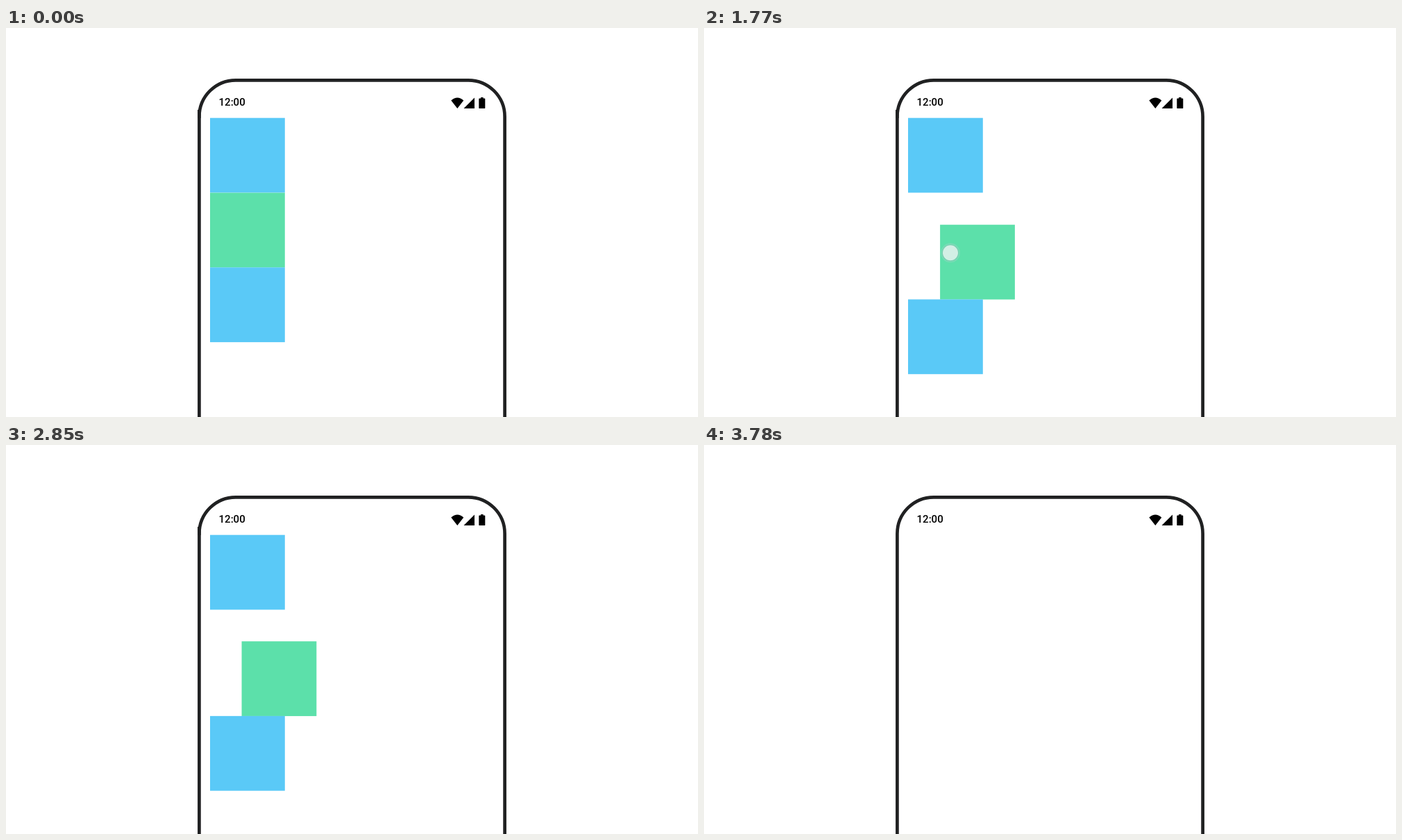
Recreate the animation shown at these times as an HTML page. Size 997x561 px, loop 4230 ms.

```html
<!DOCTYPE html>
<html lang="en">
<head>
<meta charset="utf-8">
<title>Offset animation</title>
<style>
  html, body { margin: 0; width: 100%; height: 100%; overflow: hidden; background: #fff; }
  svg { display: block; width: 997px; height: 561px; }
  .clock { font: 500 15px Roboto, sans-serif; }
  .blue { fill: #5ac9f7; }
  .green { fill: #5ce0aa; }
  .bezel { fill: none; stroke: #202122; stroke-width: 4.7; }
</style>
</head>
<body>
<svg viewBox="0 0 997 561">
  <rect class="bezel" x="278.4" y="75.3" width="440.2" height="600" rx="52.6"/>
  <text class="clock" x="306.6" y="111.6">12:00</text>
  <g id="status">
    <path d="M650.3 116 L641.3 104.4 Q650.3 96.8 659.3 104.4 Z"/>
    <path d="M659.5 116 H675 V100.5 Z"/>
    <path d="M682 101.6 H684 V100 H687.6 V101.6 H689.4 Q690.3 101.6 690.3 102.5 V115.2 Q690.3 116.1 689.4 116.1 H682.2 Q681.3 116.1 681.3 115.2 V102.5 Q681.3 101.6 682 101.6 Z"/>
  </g>
  <g id="content">
    <rect x="276" y="118" width="4.7" height="12" fill="#202122"/>
    <rect class="blue" x="294" y="129.7" width="107.8" height="107.8"/>
    <rect class="green" id="middle" x="294" y="237.6" width="107.8" height="107.8"/>
    <rect class="blue" id="last" x="294" y="345.3" width="107.8" height="107.8"/>
    <g id="touch" transform="translate(355 324.3)">
      <circle r="14" fill="#a4d4c8" opacity=".38"/>
      <circle r="12" fill="#78b8a8" opacity=".4"/>
      <circle r="11" fill="#fff" opacity=".68"/>
    </g>
  </g>
</svg>
<script>
  const LOOP = 4230, TICK = 30, HIDE_AT = 3780;
  const SHIFT = 46.1, STIFFNESS = 1500, SETTLE = 180, FADE = 150;

  // Each tap toggles the offset: press shows the dot, release fades it, move starts the spring.
  const taps = [
    { press: 840, release: 906, move: 894, to: 1 },
    { press: 1770, release: 1872, move: 1854, to: 0 },
    { press: 2550, release: 2690, move: 2684, to: 1 },
    { press: 3450, release: 3567, move: 3576, to: 0 }
  ];

  const byId = id => document.getElementById(id);
  const [content, middle, last, touch] = ['content', 'middle', 'last', 'touch'].map(byId);

  // Critically damped spring, 0 to 1.
  function spring(ms) {
    if (ms <= 0) return 0;
    if (ms >= SETTLE) return 1;
    const wt = Math.sqrt(STIFFNESS) * ms / 1000;
    return 1 - (1 + wt) * Math.exp(-wt);
  }

  function render(time) {
    const t = Math.floor((time % LOOP) / TICK) * TICK;
    let offset = 0, dot = 0;
    for (const { press, release, move, to } of taps) {
      if (t < press) break;
      const p = spring(t - move);
      offset = SHIFT * (to ? p : 1 - p);
      dot = Math.min(1, Math.max(0, 1 - (t - release) / FADE));
    }
    content.style.display = t < HIDE_AT ? '' : 'none';
    middle.setAttribute('transform', `translate(${offset} ${offset})`);
    last.setAttribute('transform', `translate(0 ${offset})`);
    touch.setAttribute('opacity', dot);
  }

  const start = performance.now();
  function loop() {
    render(performance.now() - start);
    requestAnimationFrame(loop);
  }
  loop();
</script>
</body>
</html>
```
